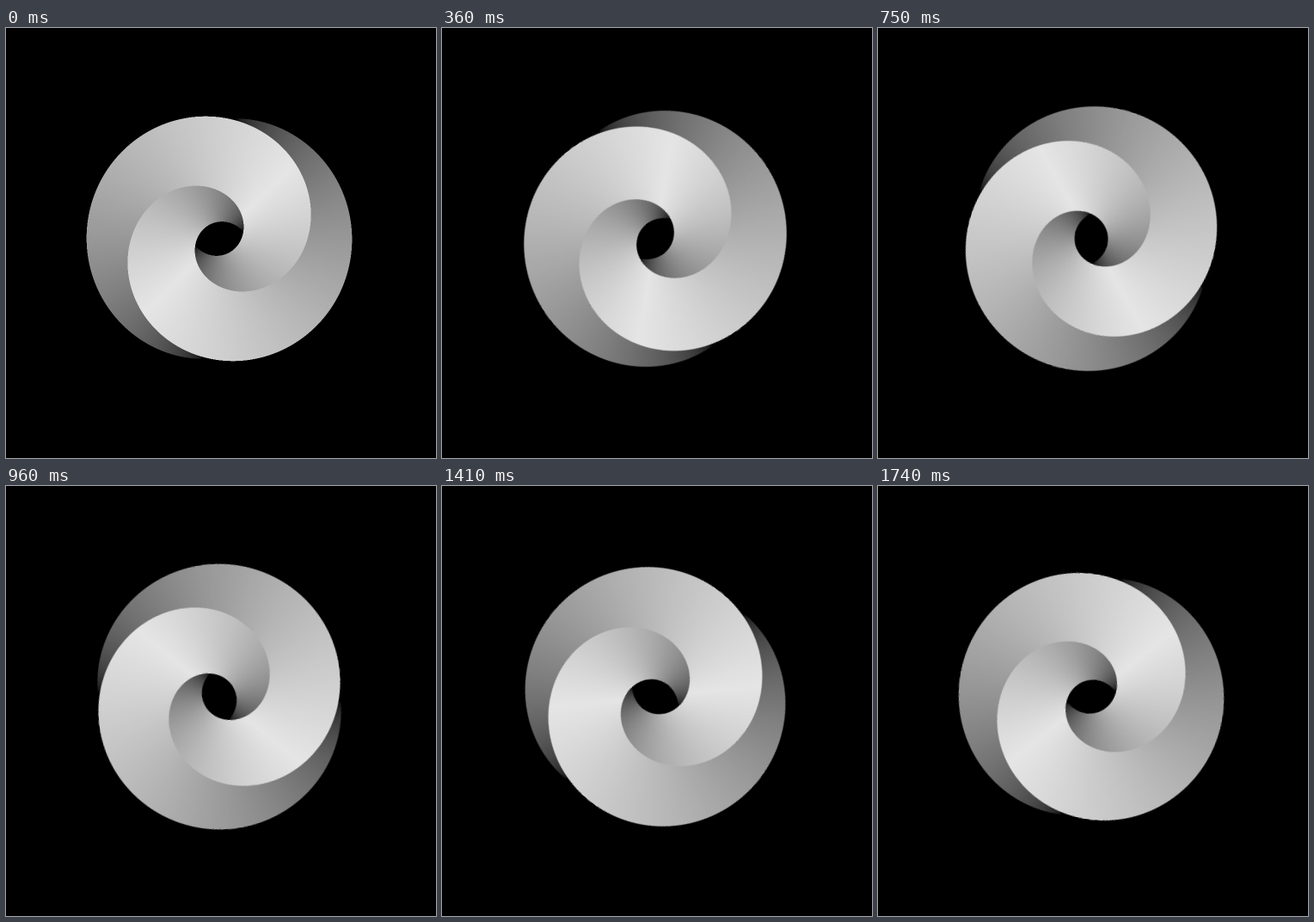
An HTML page with a canvas for the animation above (1800 ms loop, 500 by 500 pixels).

```html
<!DOCTYPE html>
<html lang="en">
<head>
<meta charset="utf-8">
<title>Turning spiral ribbon</title>
<style>
  html, body {
    margin: 0;
    width: 100%;
    height: 100%;
    overflow: hidden;
    background: #000;
  }
  canvas {
    position: absolute;
    left: 88px;
    top: 85.3px;
    width: 320px;
    height: 320px;
    animation: turn 1800ms infinite;
  }
  /* 58 steps of 3 degrees, the last one held twice as long */
  @keyframes turn {
    0% { transform: rotate(0deg); animation-timing-function: steps(58, end); }
    96.6667%, 100% { transform: rotate(-174deg); }
  }
</style>
</head>
<body>
<canvas id="ribbon" width="640" height="640"></canvas>
<script>
const ctx = document.getElementById('ribbon').getContext('2d');
const RAD = Math.PI / 180;
const START = -92, END = 499, STEP = 0.5;
const WIDEST = 4, RATE = 90 / 215;
const TAIL = -82, PEAK = 135, TIP = 341, LIGHT = 229;

// Grey level by polar angle: black at both ends of an arm, brightest at PEAK
function shade(angle) {
  const rise = Math.max(0, (angle - TAIL) / (PEAK - TAIL));
  const fall = Math.max(0, (TIP - angle) / (TIP - PEAK));
  return LIGHT * (angle < PEAK ? rise ** 0.42 : fall ** 0.5);
}

// Edge point whose normal points to s degrees, clockwise from the left
function edge(s) {
  const phase = (s - WIDEST) * RATE * RAD;
  const h = 86.7 + 68.2 * Math.cos(phase) - 0.7 * Math.cos(3 * phase);
  const slope = RATE * (2.1 * Math.sin(3 * phase) - 68.2 * Math.sin(phase));
  const c = Math.cos(s * RAD), n = Math.sin(s * RAD);
  return {
    x: -h * c + slope * n,
    y: -h * n - slope * c,
    angle: s + Math.atan2(slope, h) / RAD
  };
}

function wedge(points, side) {
  ctx.beginPath();
  ctx.moveTo(0, 0);
  for (const { x, y } of points) ctx.lineTo(x * side, y * side);
  ctx.fill();
}

ctx.translate(320, 320);
ctx.scale(2, 2);
for (let s = START; s < END; s += STEP) {
  // Each wedge reaches under the following ones, so no seams show
  const points = [0, 1, 5, 9].map(ahead => edge(Math.min(s + ahead, END)));
  const v = shade(points[0].angle).toFixed(1);
  ctx.fillStyle = `rgb(${v}, ${v}, ${v})`;
  wedge(points, 1);
  wedge(points, -1);
}
</script>
</body>
</html>
```
